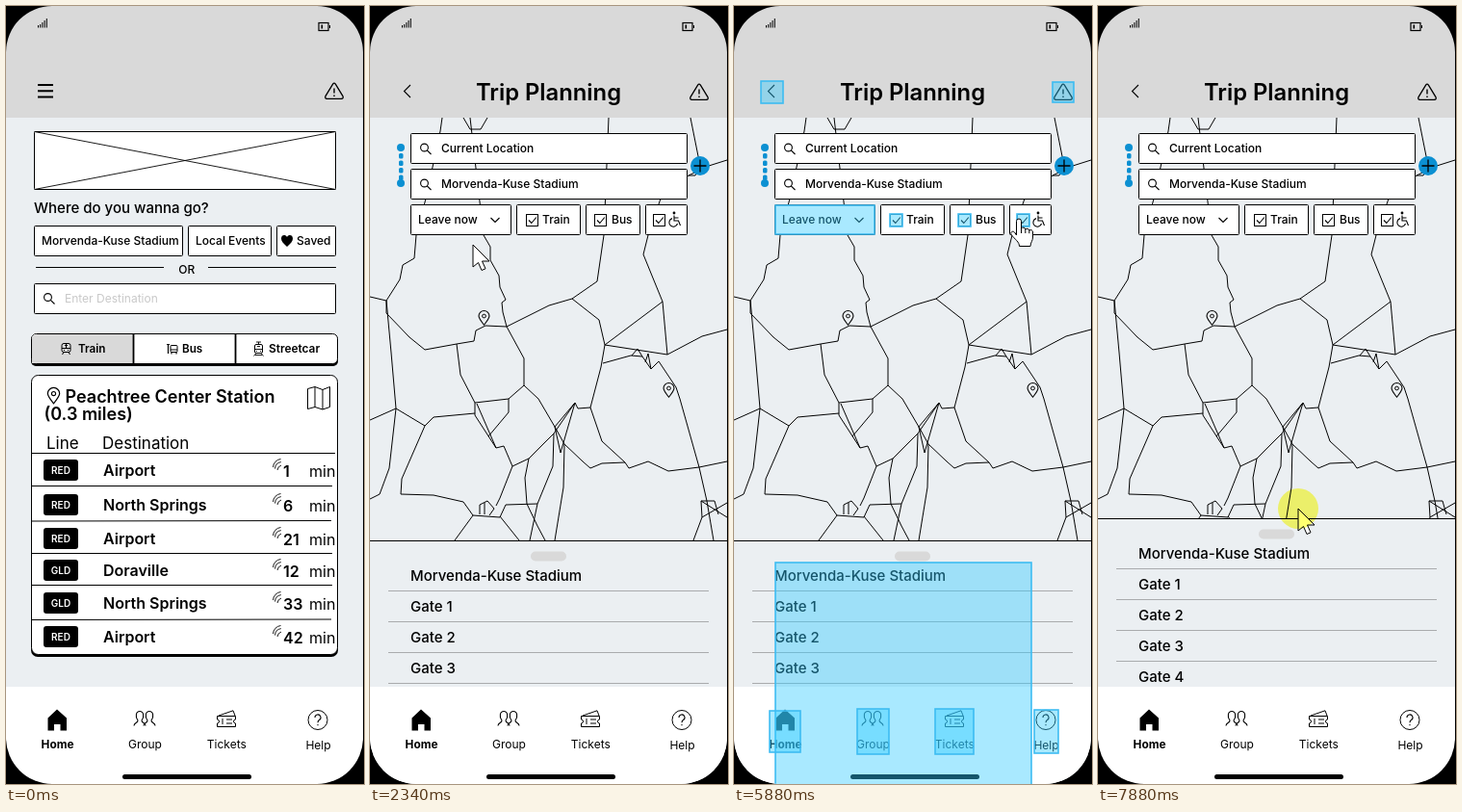
Animation, 372 px wide and 808 px high, one loop 8000 ms. Source, as an HTML page:

```html
<!DOCTYPE html>
<html lang="en">
<head>
<meta charset="utf-8">
<title>Transit app walkthrough</title>
<style>
html, body { margin: 0; width: 100%; height: 100%; overflow: hidden; background: #000; }
svg { display: block; font-family: Inter, sans-serif; }
.line { fill: none; stroke: #000; }
.box { fill: #fff; stroke: #000; }
.hint { fill: #34caff; fill-opacity: .42; stroke: #3dbcf2; stroke-width: 1.6; }
</style>
</head>
<body>
<svg id="stage" width="372" height="808" viewBox="0 0 372 808"></svg>
<script>
const stage = document.getElementById('stage');
const venue = 'Morvenda-Kuse Stadium';
const paper = '#ebeff2';

const text = (x, y, s, size = 12, weight = 500, extra = '') =>
  `<text x="${x}" y="${y}" font-size="${size}" font-weight="${weight}" ${extra}>${s}</text>`;
const middle = (x, y, s, size, weight, extra = '') =>
  text(x, y, s, size, weight, 'text-anchor="middle" ' + extra);
const path = (d, width = 1, extra = '') =>
  `<path class="line" d="${d}" stroke-width="${width}" ${extra}/>`;
const rect = (x, y, w, h, extra = 'class="box"') =>
  `<rect x="${x}" y="${y}" width="${w}" height="${h}" ${extra}/>`;
const box = (x, y, right, bottom) => rect(x, y, right - x, bottom - y, 'class="box" rx="1"');
const dot = (x, y, r, extra = 'class="line"') => `<circle cx="${x}" cy="${y}" r="${r}" ${extra}/>`;
const at = (x, y, body, id = '') => `<g ${id && `id="${id}"`} transform="translate(${x} ${y})">${body}</g>`;

const search = (x, y) => at(x, y, dot(0, 0, 3.9, 'class="line" stroke-width="1.1"') + path('M2.8 2.8L7 7', 1.1));
const alertIcon = (x, y) => at(x, y, path('M8.6 1.2Q10 -.8 11.4 1.2L19 13.6Q20 16.300 17.400 16.300H2.600Q0 16.300 1 13.600Z', 1.3)
  + path('M10 5.500V10.500M10 12.400V14', 1.4));
const pin = (x, y, scale) => at(x, y, `<g transform="scale(${scale})">`
  + path('M0 14C-4 9 -5.6 7 -5.6 4.6A5.6 5.6 0 0 1 5.6 4.6C5.6 7 4 9 0 14Z', 1.1, `style="fill:${scale < 1 ? paper : '#fff'}"`)
  + dot(0, 4.6, 1.9) + '</g>');
const wifi = (x, y) => at(x, y, path('M.5 9A9 9 0 0 1 8.5 .5M2.5 10.5A7.5 7.5 0 0 1 8.8 3.6M5 12A6 6 0 0 1 9 7', .9));
const wheelchair = at(309.5, 213, dot(6.5, 2, 1.4, '') + path('M6.5 4.5V10H11L13 15M6.5 7H11M4.5 7.6A4.4 4.4 0 1 0 10 13', 1.1));
const tick = (x, id) => rect(x, 216.5, 12, 12, 'class="line"') + path(`M${x + 2.5} 222.5l2.8 3 5-6`, 1.1, `id="${id}"`);

const header = rect(0, 0, 371, 116, 'fill="#d9d9d9"')
  + path('M33.5 22.5V20M35.7 22.5V19M37.9 22.5V17M40.1 22.5V15M42.3 22.5V13', 1)
  + rect(325, 17.5, 10, 8, 'class="line" stroke-width="1.2"') + path('M328.3 19.5V23.5', 1.6) + path('M336.5 20V23', 1);

const nav = rect(0, 707, 371, 101, 'fill="#fff"')
  + '<path d="M53 730.500L63 739.500V752.500H56.500V746H50V752.500H43.500V739.500Z"/>'
  + [139, 149].map(x => path(`M${x - 6} 747.5C${x - 6} 744 ${x - 2} 745 ${x - 2} 742C${x - 5} 738 ${x - 4} 732.5 ${x} 732.5S${x + 5} 738 ${x + 2} 742C${x + 2} 745 ${x + 6} 744 ${x + 6} 747.5`, 1.1)).join('')
  + path('M219.5 737.5H238.5V741A2 2 0 0 0 238.5 745V748.5H219.5V745A2 2 0 0 0 219.5 741ZM221 737L236 731.8L238 737M225 740V746M229 741H235M229 745H235', 1)
  + dot(324, 741.5, 10) + path('M321 739A3 3 0 1 1 325.5 741.5Q324 742.3 324 744.3M324 746V747.3', 1.1)
  + middle(53.5, 771, 'Home', 11.8, 700) + middle(144.5, 771, 'Group', 12, 400)
  + middle(229.3, 771, 'Tickets', 12, 400) + middle(324.5, 772, 'Help', 12, 400)
  + rect(121, 798, 134, 5, 'rx="2.5"');

const rows = [
  [482, 'RED', 'Airport', 1], [518, 'RED', 'North Springs', 6], [553, 'RED', 'Airport', 21],
  [586, 'GLD', 'Doraville', 12], [620, 'GLD', 'North Springs', 33], [655, 'RED', 'Airport', 42]
].map(([y, line, stop, wait]) =>
  rect(39, y - 11, 36, 22, 'rx="3"') + middle(57, y + 3.6, line, 10, 600, 'fill="#fff"')
  + text(101, y + 6, stop, 16, 600) + wifi(277, y - 12) + text(288, y + 6.5, wait, 16, 600)
  + text(315, y + 6.5, 'min', 16, 400)).join('');

const tabs = '<path d="M132 341H31Q27 341 27 345V371H132Z" fill="#d9d9d9"/>'
  + path('M132.5 341V372M238.5 341V372', 1.8)
  + at(57, 350, rect(1, .5, 9, 9, 'class="line" rx="2"') + path('M1 5.5H10M5.5 1V5.5M3 9.5L1.5 12M8 9.5L9.5 12M3 7.5H4M7 7.5H8M4 2.5H7', 1))
  + at(167, 350, rect(4, 2.5, 7, 7, 'class="line" rx="1"') + path('M0 1.5H3M1.5 1V11M4 7H11M5 9.5V11.5M10 9.5V11.5', 1.2))
  + at(257, 348, rect(1.5, 3.5, 8, 9, 'class="line" rx="1.5"') + path('M3 1H8M5.5 1V3.5M1.5 8.5H9.5M3 12.5L.5 15.5M8 12.5L10.5 15.5M2 14.5H9M3 10.5H4M7 10.5H8M4 5.5H7', .9))
  + text(75, 360, 'Train', 11.7, 600) + text(183, 360, 'Bus', 11.7, 600) + text(273, 360, 'Streetcar', 11.9, 600);

const home = rect(0, 116, 371, 591, `fill="${paper}"`)
  + path('M33 82H49M33 88.2H49M33 94.4H49', 2) + alertIcon(331, 80)
  + box(29.5, 130.5, 342.5, 190.5) + path('M29.5 130.5L342.5 190.5M342.5 130.5L29.5 190.5', .9)
  + text(29, 215, 'Where do you wanna go?', 15)
  + box(29.5, 228.5, 183.5, 259.5) + text(37, 248, venue)
  + box(189.5, 228.5, 275.5, 259.5) + text(197, 248, 'Local Events')
  + box(281.5, 228.5, 342.5, 259.5) + text(302, 248, 'Saved')
  + '<path d="M292 250C288 246.5 286 244.500 286 241.500C286 237.500 290.500 237 292 240C293.500 237 298 237.500 298 241.500C298 244.500 296 246.500 292 250Z"/>'
  + path('M31 271.5H164M210 271.5H343') + middle(187.7, 277.5, 'OR', 12, 500)
  + box(29.5, 288.5, 342.5, 319.5) + search(43.5, 302.5)
  + text(61, 308, 'Enter Destination', 12, 400, 'fill="#c9c9c9"')
  + rect(26, 342, 319, 32, 'rx="5"') + rect(26.5, 340.5, 318, 31, 'class="box" rx="5"') + tabs
  + rect(26, 390, 319, 286, 'rx="7"') + rect(26.5, 383.5, 318, 290, 'class="box" rx="7"')
  + pin(49.5, 397.5, 1.1) + text(61.5, 411.5, 'Peachtree Center Station', 18, 600)
  + text(39.5, 429.5, '(0.3 miles)', 18, 600)
  + path('M313.500 397.500L321 395.500L329 398.500L336.500 395.500V416.500L329 419L321 416.500L313.500 418.500ZM321 395.500V416.500M329 398.500V419')
  + text(42, 460, 'Line', 17, 400) + text(100, 460, 'Destination', 17, 400)
  + path('M27 464.5H342M27 498.5H339M27 535L338 534.500M27 568.500H339M27 601.500H339M27 637.500L338 637') + rows;

const roads = [
  'M75 116L73 130L58 200L48 238L46 262L34 269L31 284L17 306L0 302M17 306V319L41 344L57 357L90 351L108 348L110 337L120 332L142 333L138 318L137 308L141 305L135 292L134 280L125 264V250L118 238L104 116M97 116L104 128H115L122 116',
  'M142 333L186 311L210 304L236 286L243 238L248 116M210 304L238 326L244 352L304 307L284 258L289 238L302 200L331 176L352 166L371 160M304 307L309 362L244 352M309 362L345 343L371 336M331 176H338L343 166L333 116',
  'M244 352L240 375L229 417L216 418L213 412L192 437L175 408L160 394V366L142 333M90 351L94 383L109 412L144 408L160 394M144 408V422L123 447M109 412V425L131 459L111 413',
  'M17 306L22 360L27 418L0 430M27 418L57 436L66 427L109 423M57 436L33 491L32 507L66 508L97 515L107 529L135 531L141 518L174 517M27 418L20 480L10 507L0 512M107 529L88 555M114 528V518L122 514L129 522L124 529M119 516V528',
  'M135 530L155 555M131 459L139 457L148 478L135 511L131 519M148 478L165 470L191 444L213 412M165 470L161 490L163 517L174 540L182 555M191 444L190 478L174 517L166 555M192 437L202 455L201 500L192 555M213 412L198 464L192 437',
  'M202 455L221 473L229 480L241 475L265 474L269 480L289 473L310 483L342 479L322 408L318 396L300 369L292 377L283 364L271 363L242 371M272 363L278 356L283 364M286 370L289 361L292 377M342 479L371 473M342 479L350 514L357 555M229 417L241 452L265 474',
  'M371 531L344 514L345 531L371 516M345 531L336 555M344 514H358L362 528'
].map(d => path(d)).join('');

const gates = [venue, 'Gate 1', 'Gate 2', 'Gate 3', 'Gate 4', 'Gate 5'].map((s, i) =>
  text(42, 597 + 32 * i, s, 15) + path(`M19 ${607.5 + 32 * i}H352`, 1, 'style="stroke:#a9abad"')).join('');
const sheet = rect(-1, 555.5, 373, 280, `fill="${paper}" stroke="#000"`)
  + rect(167, 566.5, 37, 10, 'rx="5" fill="#d9d9d9"') + gates;

const planner = rect(0, 116, 371, 591, `fill="${paper}"`)
  + path('M42 82L35.500 88.500L42 95', 1.1) + middle(185.5, 98, 'Trip Planning', 23.8, 600) + alertIcon(332, 81)
  + roads + pin(118.5, 317.5, .98) + pin(310.5, 392.5, .98)
  + box(42.5, 132.5, 329.5, 163.5) + search(56.5, 147) + text(74, 152, 'Current Location')
  + box(42.5, 169.5, 329.5, 200.5) + search(56.5, 184) + text(74, 189, venue)
  + [[42.5, 146.5], [152.5, 218.5], [224.5, 280.5], [286.5, 329.5]].map(([x, right]) => box(x, 206.5, right, 237.5)).join('')
  + text(50, 226, 'Leave now') + path('M125.500 220L130 224.500L134.500 220', 1.1, 'id="chevron"')
  + tick(162.5, 'trainTick') + text(179, 226, 'Train')
  + tick(233.5, 'busTick') + text(251, 226, 'Bus') + tick(294.5, 'accessTick') + wheelchair
  + '<g fill="#0c90d2">' + dot(32, 147, 4, '') + dot(32, 184, 4, '') + dot(343, 166, 10, '')
  + [153, 160.5, 168, 175.5].map(y => rect(30, y, 4.5, 5.5, 'rx="1.5"')).join('') + '</g>'
  + path('M343 159.500V172.500M336.500 166H349.500', 1.3)
  + at(0, 0, sheet, 'sheet')
  + '<g id="menu">' + box(42.5, 239.5, 146.5, 329.5) + text(50, 260, 'Leave now') + text(49, 290, 'Arrive at') + text(49, 320, 'Depart at') + '</g>';

const hints = [
  [28, 78, 23, 23], [331, 79, 22, 21], [43, 207, 103, 30], [162, 216, 13, 13], [233, 216, 13, 13], [294, 216, 13, 13],
  [43, 578, 266, 240], [37, 732, 32, 43], [128, 730, 33, 47], [209, 730, 40, 47], [312, 731, 25, 45]
].map(r => rect(...r, 'class="hint"')).join('');

const arrow = '<path class="box" d="M0 0V23L5.500 18.500L9 26.500L13 24.800L9.500 17H17Z"/>';
const hand = '<path class="box" transform="translate(-9 -1)" d="M6.500 18V3.500a2.500 2.500 0 0 1 5 0V11a2.400 2.400 0 0 1 4.300 1a2.300 2.300 0 0 1 4 1.200a2.200 2.200 0 0 1 3.700 1.800V20c0 4-2.500 5.500-2.500 9.500H9.500C9.500 25 5 22.500 1.200 17.500c-1.500-2.500 1.500-4.500 3.300-2.500zM11.500 11v5M15.800 12v4M19.800 13.200v3"/>';

stage.innerHTML = '<clipPath id="phone">' + rect(0, 0, 371, 808, 'rx="48"') + '</clipPath><g clip-path="url(#phone)">'
  + header + `<g id="home">${home}</g><g id="planner">${planner}</g>` + nav + `<g id="hints">${hints}</g>`
  + at(0, 0, `<g id="arrow">${arrow}</g><g id="hand">${hand}</g>`
    + dot(0, 0, 21, 'id="press" fill="#ffff70" style="mix-blend-mode:multiply"'), 'cursor') + '</g>';

// Cursor path: time, x, y
const route = [
  [80, 312, 775], [790, 150, 337], [1230, 140, 328], [1370, 140, 328], [1790, 87, 331], [2120, 107, 248],
  [2450, 107, 248], [2700, 113, 261], [3230, 130, 224], [3450, 130, 222], [3890, 130, 230], [4230, 150, 222],
  [4350, 166, 219], [4890, 165, 220], [5110, 165, 220], [5700, 296, 221], [6110, 296, 221], [6300, 300, 222],
  [6880, 300, 222], [7210, 61, 618], [7550, 61, 618], [7880, 208, 522], [8000, 208, 522]
];
const presses = [[2230, 2340], [3450, 3560], [4350, 4460], [6370, 6480], [6750, 6860], [7550, 8000]];

const el = id => document.getElementById(id);
const show = (id, on) => el(id).setAttribute('display', on ? 'inline' : 'none');
const between = (t, a, b) => t >= a && t < b;
const ramp = (t, a, b) => Math.min(1, Math.max(0, (t - a) / (b - a)));

function cursorAt(t) {
  const i = Math.max(1, route.findIndex(k => k[0] > t));
  const [t0, x0, y0] = route[i - 1], [t1, x1, y1] = route[i];
  const u = ramp(t, t0, t1), s = u * u * (3 - 2 * u);
  return [x0 + (x1 - x0) * s, y0 + (y1 - y0) * s];
}

function draw(now) {
  const t = now % 8000;
  const [x, y] = cursorAt(t);
  const pointing = between(t, 2000, 2230) || between(t, 3000, 6930);
  const open = between(t, 3450, 4350);

  show('home', t < 2230);
  show('planner', t >= 2230);
  show('menu', open);
  el('chevron').setAttribute('transform', open ? 'rotate(180 130 222.25)' : '');
  show('accessTick', !between(t, 6450, 6800));
  el('hints').setAttribute('opacity', ramp(t, 5600, 5720) - ramp(t, 6110, 6330));
  el('sheet').setAttribute('transform', `translate(0 ${-23 * ramp(t, 7550, 7880)})`);

  show('cursor', t >= 80);
  el('cursor').setAttribute('transform', `translate(${x} ${y})`);
  show('arrow', !pointing);
  show('hand', pointing);
  show('press', presses.some(([a, b]) => between(t, a, b)));
  requestAnimationFrame(draw);
}
requestAnimationFrame(draw);
</script>
</body>
</html>
```
